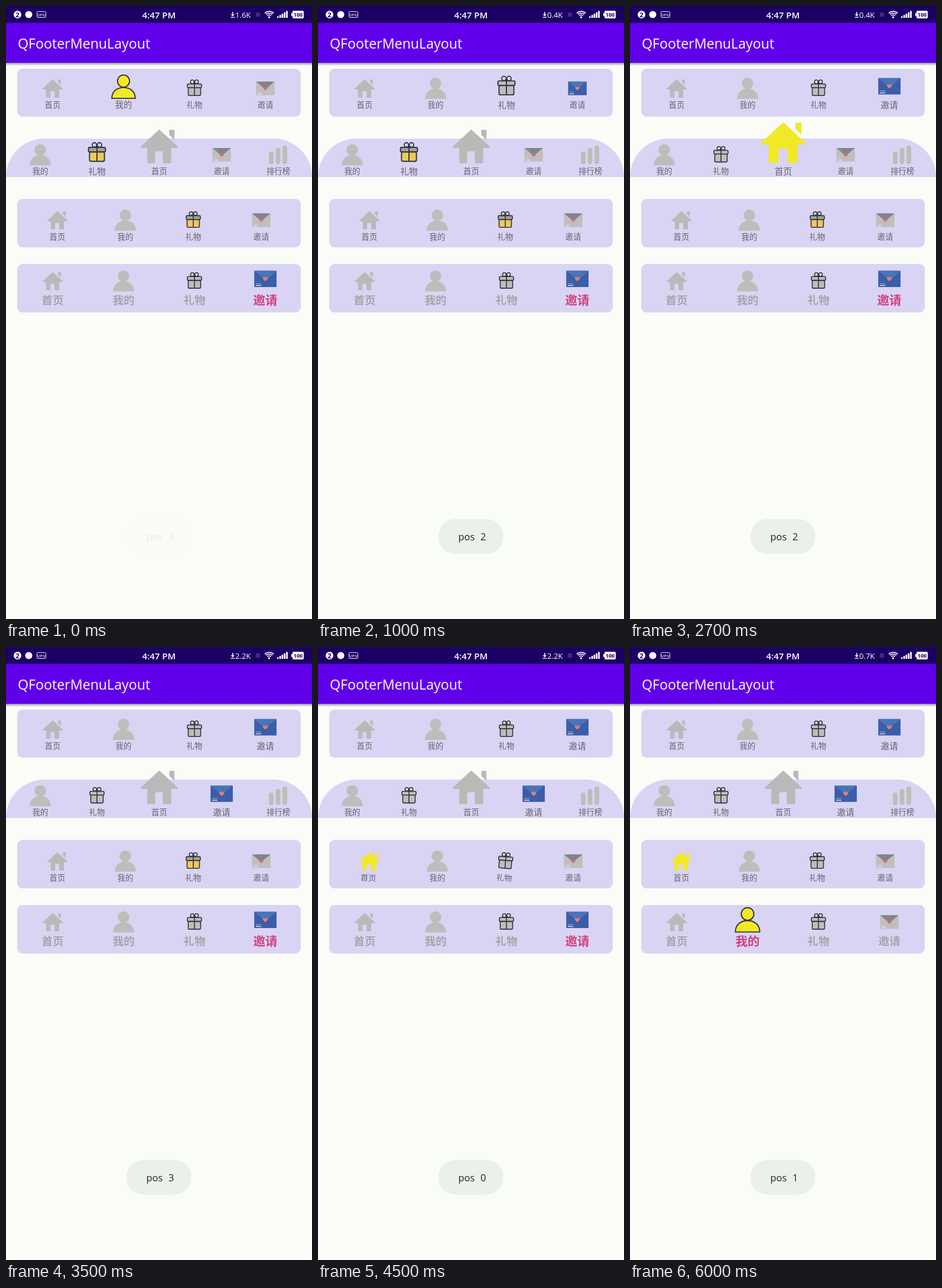
These frames come from a looping animation (518 by 1036 pixels, 6100 ms). An HTML page with a canvas:

```html
<!DOCTYPE html>
<html lang="zh">
<head>
<meta charset="utf-8">
<style>
  html, body { margin: 0; width: 100%; height: 100%; overflow: hidden; background: #f9fcf7; }
  canvas { display: block; width: 518px; height: 1036px; }
</style>
</head>
<body>
<canvas id="stage" width="518" height="1036"></canvas>
<script>
const ctx = document.getElementById('stage').getContext('2d');
const LOOP = 6100, STEP = 100, GROW = 300, SHAKE = 500;
const LATIN = '"Open Sans", "Noto Sans", sans-serif';
const CJK = '"Noto Sans CJK SC", "Noto Sans CJK", sans-serif';
const GREY = '#bcbebc', YELLOW = '#f2e926', INK = '#33323b', BAR = '#dad4f4', STATUS = '#1c0064';

const clamp = v => Math.max(0, Math.min(1, v));
const ease = v => (1 - Math.cos(Math.PI * clamp(v))) / 2;
// Latest entry of [[time, value], ...] at time t
const latest = (list, t) => list.filter(e => e[0] <= t).pop();

function box(x, y, w, h, r, fill) {
  ctx.beginPath();
  ctx.roundRect(x, y, w, h, r);
  if (fill) { ctx.fillStyle = fill; ctx.fill(); }
}
function disc(x, y, r, fill) {
  ctx.beginPath();
  ctx.arc(x, y, r, 0, 7);
  ctx.fillStyle = fill;
  ctx.fill();
}
function poly(fill, ...pts) {
  ctx.beginPath();
  for (let i = 0; i < pts.length; i += 2) ctx.lineTo(pts[i], pts[i + 1]);
  ctx.closePath();
  ctx.fillStyle = fill;
  ctx.fill();
}
function text(s, x, y, font, fill, align = 'left') {
  ctx.font = font;
  ctx.fillStyle = fill;
  ctx.textAlign = align;
  ctx.textBaseline = 'alphabetic';
  ctx.fillText(s, x, y);
}
function outline(color, width) {
  ctx.strokeStyle = color;
  ctx.lineWidth = width;
  ctx.stroke();
}

// Each icon is drawn in a 36 x 36 box
const icons = {
  home(on) {
    const c = on ? YELLOW : '#b8bab8';
    ctx.lineJoin = 'round';
    poly(c, 18, 4.3, 2, 19, 7.8, 19, 7.8, 33, 13.2, 33, 13.2, 22, 22.2, 22, 22.2, 33, 28, 33, 28, 19, 34, 19);
    outline(c, 2);
    poly(c, 27.3, 3.3, 32, 3.3, 32, 12.5, 27.3, 8);
  },
  person(on) {
    const c = on ? YELLOW : GREY, i = on ? .8 : 0;
    ctx.beginPath();
    ctx.moveTo(i, 36 - i);
    ctx.bezierCurveTo(i, 25, 8, 18.5 + i, 18, 18.5 + i);
    ctx.bezierCurveTo(28, 18.5 + i, 36 - i, 25, 36 - i, 36 - i);
    ctx.closePath();
    ctx.fillStyle = c;
    ctx.fill();
    if (on) outline(INK, 1.6);
    disc(18, 9.8, 9.7 - i, c);
    if (on) outline(INK, 1.6);
  },
  gift(on) {
    ctx.lineJoin = 'round';
    for (const s of [-1, 1]) {
      ctx.beginPath();
      ctx.ellipse(18 + s * 3.6, 7.2, 3.1, 3.1, 0, 0, 7);
      outline(INK, 1.5);
    }
    box(7.5, 17, 21, 13.3, 2, on ? '#ecca5a' : GREY);
    outline(INK, 1.6);
    box(6, 10.7, 24, 6.3, 1.5, on ? '#a0a49c' : GREY);
    outline(INK, 1.6);
    ctx.beginPath();
    ctx.moveTo(18, 8);
    ctx.lineTo(18, 30);
    outline(INK, 1.6);
  },
  mail(on) {
    box(2.4, 6.7, 31.4, 23, .5, on ? '#3a5ea9' : '#bfbfbd');
    poly(on ? '#4b74b8' : '#80848b', 2.7, 6.7, 33.5, 6.7, 18.1, 20);
    ctx.beginPath();
    ctx.moveTo(18.1, 21.5);
    ctx.bezierCurveTo(11.1, 16.5, 16.1, 13.5, 18.1, 16.7);
    ctx.bezierCurveTo(20.1, 13.5, 25.1, 16.5, 18.1, 21.5);
    ctx.fillStyle = on ? '#e27c78' : '#d9647f';
    ctx.fill();
    box(4.7, 24.6, 7.5, .6, 0, '#d5d9e2');
    box(4.7, 27, 7.5, 1, 0, '#eef0f4');
  },
  rank() {
    box(2, 12.5, 8, 21.5, 4, GREY);
    box(13.5, 6.5, 8, 27.5, 4, GREY);
    box(25, 2.5, 8, 31.5, 4, GREY);
  }
};

const names = { home: '首页', person: '我的', gift: '礼物', mail: '邀请', rank: '排行榜' };
const four = ['home', 'person', 'gift', 'mail'];
// taps: [time, selected index]; bottom: lower edge of the icons
const rows = [
  { frame: [19, 106, 480, 81, 9], keys: four, xs: [79, 199, 319, 439], bottom: 157, label: 167,
    taps: [[-2000, 0], [-200, 1], [500, 2], [1000, 3]] },
  { frame: [0, 224, 518, 65, [65, 65, 0, 0]], keys: ['person', 'gift', 'home', 'mail', 'rank'],
    xs: [58, 154, 259.5, 365, 461], bottom: 269.3, label: 279, big: 2,
    taps: [[-2000, 1], [2300, 2], [3100, 3]] },
  { frame: [19, 326, 480, 82, 9], keys: four, xs: [87, 202, 317, 432], bottom: 379.7, label: 390, shake: true,
    taps: [[-2000, 2], [4200, 0]] },
  { frame: [19, 436, 480, 82, 9], keys: four, xs: [79, 199, 319, 439], bottom: 482.6, label: 497, bold: true,
    taps: [[-2000, 3], [5500, 1]] }
];

function drawRow(row, t) {
  box(...row.frame, BAR);
  const past = row.taps.filter(e => e[0] <= t);
  const [at, cur] = past[past.length - 1];
  const prev = past.length > 1 ? past[past.length - 2][1] : -1;
  const p = ease((t - at) / GROW), u = clamp((t - at) / SHAKE);
  row.keys.forEach((key, i) => {
    const on = i === cur;
    const grow = row.shake ? 0 : on ? p : i === prev && at > 0 ? 1 - p : 0;
    ctx.save();
    ctx.translate(row.xs[i], row.bottom);
    if (row.shake && (on || i === prev)) {
      ctx.translate(0, -12);
      ctx.rotate(12 * Math.sin(4 * Math.PI * u) * (1 - u) * Math.PI / 180);
      ctx.translate(0, 12);
    }
    ctx.save();
    const k = (i === row.big ? 66 / 36 : 1) * (1 + .2 * grow);
    ctx.scale(k, k);
    ctx.translate(-18, -36);
    icons[key](on);
    ctx.restore();
    const size = (row.bold ? 18.6 : 13.4) * (1 + .1 * grow);
    const color = row.bold ? (on ? '#d0407f' : '#a6a5aa') : '#67636f';
    text(names[key], 0, row.label - row.bottom + size * .38, `${row.bold ? 700 : 400} ${size}px ${CJK}`, color, 'center');
    ctx.restore();
  });
}

const speeds = [[0, '1.6K'], [700, '0.4K'], [3000, '2.2K'], [5300, '0.7K']];

function drawTop(t) {
  const g = ctx.createLinearGradient(0, 96, 0, 101);
  g.addColorStop(0, 'rgba(60,60,70,.5)');
  g.addColorStop(1, 'rgba(60,60,70,0)');
  box(0, 96, 518, 5, 0, g);
  box(0, 28, 518, 68, 0, '#6000ea');
  box(0, 0, 518, 28.5, 0, STATUS);
  text('QFooterMenuLayout', 20, 71.5, `500 23.2px ${LATIN}`, '#fff');

  disc(19.5, 14.5, 6.5, '#fff');
  text('2', 19.5, 18.5, `700 11px ${LATIN}`, STATUS, 'center');
  disc(38.5, 14.5, 6, '#fff');
  box(52.5, 9.5, 15, 10, 1);
  outline('#e4def2', 1);
  text('VPN', 60, 17.5, `500 7px ${LATIN}`, '#fff', 'center');
  text('4:47 PM', 259, 20.5, `600 15px ${LATIN}`, '#fff', 'center');

  box(383, 10, 1.5, 6, 0, '#fff');
  poly('#fff', 380.5, 14, 387, 14, 383.7, 17.5);
  box(380.5, 18.5, 6.5, 1.3, 0, '#fff');
  text(latest(speeds, t)[1], 388, 19.5, `500 13px ${LATIN}`, '#fff');
  box(423, 11, 7, 7, 0, '#3f2a8e');

  disc(445.5, 19, 1.7, '#fff');
  for (const r of [4.5, 7.5, 10.5]) {
    ctx.beginPath();
    ctx.arc(445.5, 19.5, r, -Math.PI * .75, -Math.PI * .25);
    outline('#fff', 1.7);
  }
  for (let i = 0; i < 5; i++) box(459 + i * 3.8, 17.5 - i * 2.3, 2.7, 2.5 + i * 2.3, 0, '#fff');
  box(485, 8, 19, 13, 2, '#fff');
  box(483, 12, 2, 5, 0, '#fff');
  text('100', 494.5, 18, `700 9px ${LATIN}`, STATUS, 'center');
}

const digits = [[0, 1], [600, 2], [1100, 3], [2400, 2], [3200, 3], [4200, 0], [5600, 1]];

function drawToast(t) {
  const shown = t < 1000 ? .08 + t / 300
    : t < 4200 ? 1 - (t - 3850) / 250
    : (t - 4200) / 200;
  ctx.globalAlpha = clamp(shown);
  box(204, 867, 109.5, 58.5, 28, '#ecf0ea');
  const font = `400 16.5px ${LATIN}`;
  text('pos', 237.5, 903, font, '#24222c');
  text(latest(digits, t)[1], 275, 903, font, '#24222c');
  ctx.globalAlpha = 1;
}

function draw(now) {
  const t = Math.floor((now % LOOP) / STEP) * STEP;
  box(0, 0, 518, 1036, 0, '#f9fcf7');
  drawTop(t);
  rows.forEach(row => drawRow(row, t));
  drawToast(t);
}

let start;
function tick(now) {
  start ??= now;
  draw(now - start);
  requestAnimationFrame(tick);
}
draw(0);
requestAnimationFrame(tick);
</script>
</body>
</html>
```
